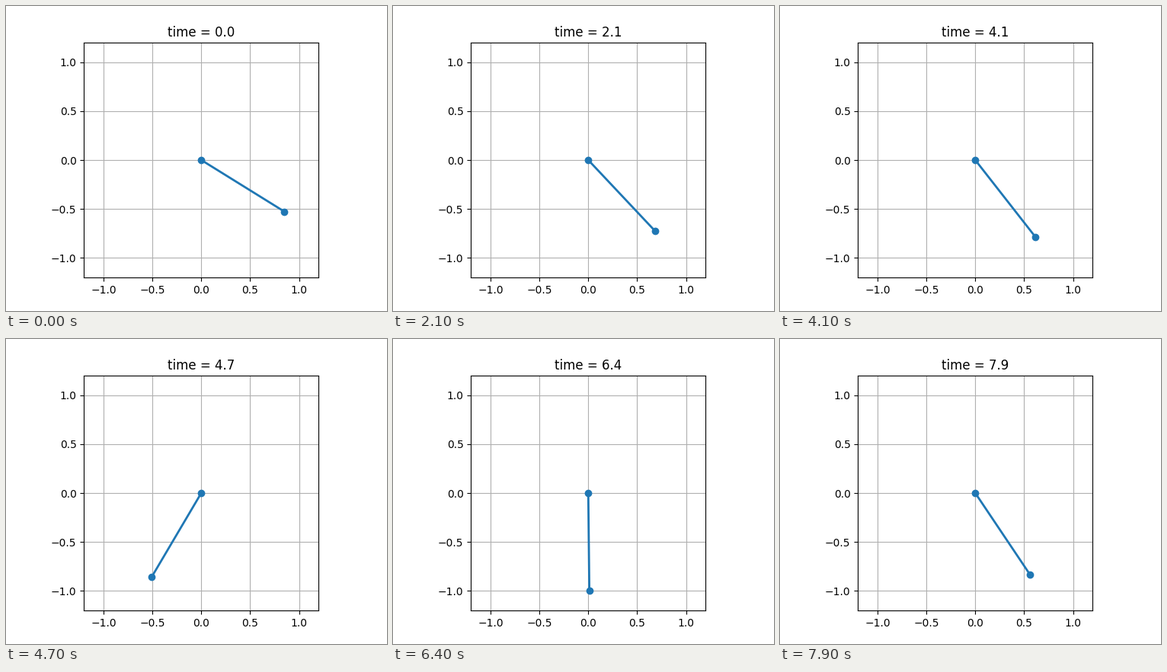
Animation of 500x400 px, one loop 8 s. Source, as a matplotlib script:

```python
import numpy as np
import matplotlib.pyplot as plt
from matplotlib.animation import FuncAnimation

STEP_MS = 100
FRAMES = 80
REST = 0.05  # resting angle from straight down, rad


def angle(t):
    """Damped swing that quickens as its amplitude decays."""
    amp = (0.9306 + 0.0528 * t) ** -2
    phase = 0.58 + 3.019 * t + 0.0142 * t ** 2
    return REST + amp * np.cos(phase)


fig = plt.figure(figsize=(5, 4), dpi=100)
ax = fig.add_subplot(aspect="equal", xlim=(-1.2, 1.2), ylim=(-1.2, 1.2))
ax.grid()
ticks = np.arange(-1, 1.1, 0.5)
ax.set_xticks(ticks)
ax.set_yticks(ticks)
rod, = ax.plot([], [], "o-", lw=2)
title = ax.set_title("")


def update(n):
    t = n * STEP_MS / 1000
    th = angle(t)
    rod.set_data([0, np.sin(th)], [0, -np.cos(th)])
    title.set_text(f"time = {t:.1f}")
    return rod, title


anim = FuncAnimation(fig, update, frames=FRAMES, interval=STEP_MS,
                     repeat=True, repeat_delay=0, blit=False)
plt.show()
```
